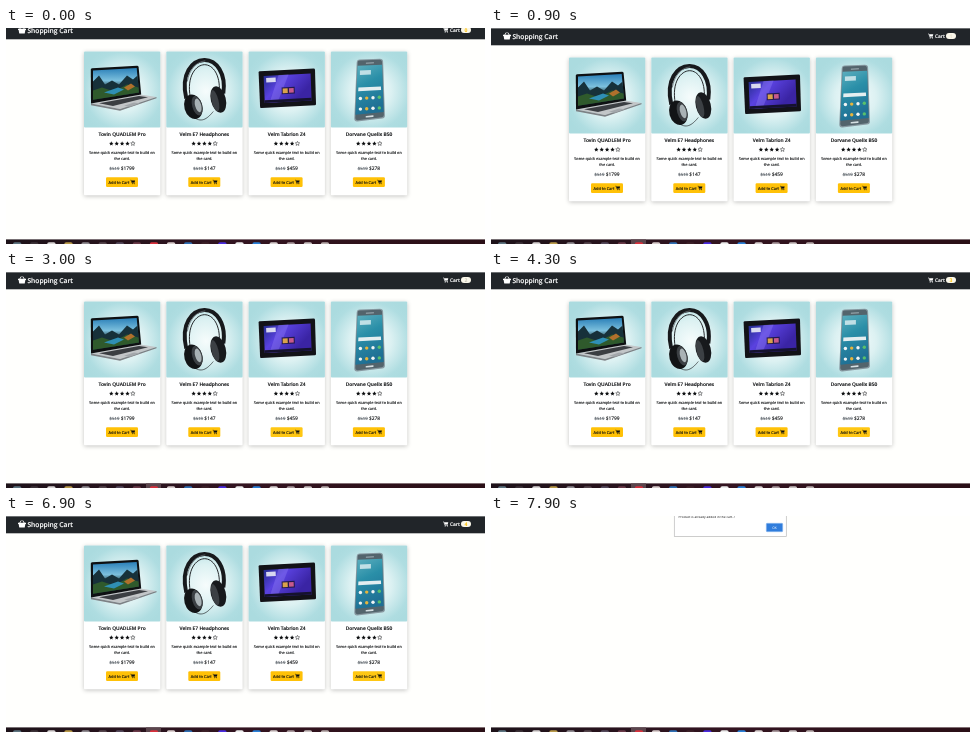
Write an HTML page that moves like this. It is 479 by 216 pixels and loops after 8000 ms.

```html
<!DOCTYPE html>
<html lang="en">
<head>
<meta charset="utf-8">
<title>Shopping Cart</title>
<style>
  html, body { margin: 0; width: 479px; height: 216px; overflow: hidden; background: #fffffd; }
  svg { display: block; font-family: "Open Sans", "Noto Sans", sans-serif; text-rendering: geometricPrecision; }
  .card { filter: drop-shadow(0 1.5px 2px rgba(0, 0, 0, .24)); }
  .mid { text-anchor: middle; }
  .head { font-weight: 600; }
  .ink { fill: #0c0e10; stroke: #0c0e10; stroke-width: .12; }
  .old { fill: #5a6168; stroke: #5a6168; text-decoration: line-through; text-decoration-thickness: .3px; }
</style>
</head>
<body>
<svg id="stage" width="479" height="216" viewBox="0 0 479 216">
  <defs>
    <radialGradient id="backdrop" cx=".52" cy=".52" r=".6">
      <stop offset="0" stop-color="#f6fcfc"/>
      <stop offset=".45" stop-color="#dcf1f2"/>
      <stop offset=".85" stop-color="#afdde1"/>
      <stop offset="1" stop-color="#abdbdf"/>
    </radialGradient>
    <linearGradient id="sky" x2="0" y2="1">
      <stop offset="0" stop-color="#2a7fb8"/>
      <stop offset=".4" stop-color="#7cc0dd"/>
      <stop offset=".6" stop-color="#2a4a52"/>
      <stop offset="1" stop-color="#0e1c1e"/>
    </linearGradient>
    <linearGradient id="violet" x2=".9" y2=".5">
      <stop offset="0" stop-color="#1f2a86"/>
      <stop offset=".45" stop-color="#5a42e0"/>
      <stop offset="1" stop-color="#3a24a4"/>
    </linearGradient>
    <linearGradient id="aqua" x2=".3" y2="1">
      <stop offset="0" stop-color="#5fb0bf"/>
      <stop offset=".45" stop-color="#2a8fa8"/>
      <stop offset="1" stop-color="#1f6f94"/>
    </linearGradient>
    <linearGradient id="bar">
      <stop offset="0" stop-color="#1d1219"/>
      <stop offset=".5" stop-color="#331420"/>
      <stop offset="1" stop-color="#2a0f16"/>
    </linearGradient>
    <g id="trolley">
      <path d="M0 .3H.9L1.9 3.6H4.9" fill="none" stroke="currentColor" stroke-width=".55"/>
      <path d="M1.1 .7H5.3L4.7 3H1.7Z" fill="currentColor"/>
      <circle cx="2.2" cy="4.3" r=".55" fill="currentColor"/>
      <circle cx="4.4" cy="4.3" r=".55" fill="currentColor"/>
    </g>
    <g id="laptop">
      <path d="M7 52L56 43L72.5 45.6L36 57.5Z" fill="#c3c6c8"/>
      <path d="M7 52L36 57.5L72.5 45.6V46.8L36 59.2L7 53.8Z" fill="#7d8185"/>
      <path d="M15 51.8L55 44.4L64 45.8L29 54.6Z" fill="#3b3e42"/>
      <path d="M40 54.2L50 51L56 51.8L46 55.2Z" fill="#a3a7ab"/>
      <path d="M6.8 18.2Q6.8 17 8 16.8L53 14.2Q54.4 14.2 54.6 15.4L57.2 43L7 52Z" fill="#0e1012"/>
      <path d="M9 19.1L52.7 16.4L54.9 41L9 48.2Z" fill="url(#sky)"/>
      <path d="M9 30L15 24L21 33L28 29L35 33L43 24L49 28L53.6 24L54.9 41L9 48.2Z" fill="#17313a"/>
      <path d="M9 39L18 36L30 40L43 33L54.5 36L54.9 41L9 48.2Z" fill="#2f5a2c"/>
      <path d="M20 41L34 36L40 38L30 43Z" fill="#2f8fb5"/>
      <path d="M40 36L47 32L51 35L44 39Z" fill="#b0702c"/>
    </g>
    <g id="phones" fill="none">
      <path d="M20 47C14 22 26 8.8 38 8.5C50 8.2 60 22 57 42" stroke="#17191c" stroke-width="4"/>
      <path d="M24 46C20 24 30 13.5 38 13.2C47 13 54 24 53 40" stroke="#26292c" stroke-width="1"/>
      <path d="M21 30C23 18 30 10 39 9.4" stroke="#666c71" stroke-width=".8"/>
      <path d="M28 66C36 72 42 66 47 60" stroke="#26292c" stroke-width=".7"/>
      <g transform="rotate(-14 52 48)">
        <ellipse cx="52" cy="48" rx="7.5" ry="13.5" fill="#17191c"/>
        <ellipse cx="48.6" cy="48.5" rx="3.4" ry="11" fill="#3c4044"/>
      </g>
      <g transform="rotate(-16 28 55)">
        <ellipse cx="27" cy="55" rx="9" ry="12.5" fill="#121416"/>
        <ellipse cx="31" cy="55" rx="5" ry="10" fill="#3c4044"/>
        <ellipse cx="32" cy="55" rx="3" ry="7" fill="#a9b2b5"/>
      </g>
    </g>
    <g id="tablet">
      <path d="M10 21Q10 19.8 11.2 19.7L65 17Q66.3 17 66.4 18.2L67.4 52.5Q67.4 53.7 66.2 53.8L13 56.6Q11.6 56.6 11.5 55.4Z" fill="#121217"/>
      <path d="M15 24.4L62 22L63 49L16.2 51.5Z" fill="url(#violet)"/>
      <path d="M30 23.6L40 23.1L29 50.8L21 51.2Z" fill="#8e7cf2" opacity=".4"/>
      <path d="M17.5 26.5L27 26L27.2 30.5L17.7 31Z" fill="#d8d8f0"/>
      <path d="M33 36L46 35.3L46.3 42L33.3 42.7Z" fill="#241a4c"/>
      <path d="M34 37L39 36.7L39.2 41.4L34.2 41.7Z" fill="#d9a24a"/>
      <path d="M40.3 36.7L45 36.4L45.2 41L40.5 41.3Z" fill="#c85a8c"/>
      <path d="M16 48.8L62.9 46.3L63 49L16.2 51.5Z" fill="#15122e"/>
    </g>
    <g id="mobile">
      <path d="M25.8 11Q26 8.2 28.8 8.1L49 7.2Q52 7.2 52.2 10L54 64Q54.2 66.6 51.2 67L26.6 70Q23.4 70.3 23.4 67Z" fill="#8798a0"/>
      <path d="M26.8 11Q26.8 9.2 28.7 9.1L48.8 8.3Q50.9 8.3 51.1 10.2L53 63.4Q53 65.4 50.9 65.7L26.8 68.7Q24.4 68.9 24.4 66.6Z" fill="#53646c"/>
      <path d="M26.6 14.2L51.2 13.2L52.8 60.4L24.5 63.2Z" fill="url(#aqua)"/>
      <path d="M29 19L40 18.5L40 23L29 23.6Z" fill="#e0f0f2" opacity=".8"/>
      <path d="M27.5 36L50 35L50.2 38.6L27.3 39.8Z" fill="#e4eef0"/>
      <path d="M35 11.7L43 11.3" stroke="#c6d3d8" stroke-width=".7"/>
      <path d="M35.5 65.3L42 64.6" stroke="#d5dfe2" stroke-width="1.6" stroke-linecap="round"/>
      <g id="apps">
        <circle cx="29.5" cy="47" r="1.7" fill="#f0f4f4"/><circle cx="35.8" cy="46.6" r="1.7" fill="#e6b53c"/>
        <circle cx="42.1" cy="46.2" r="1.7" fill="#f0f4f4"/><circle cx="48.4" cy="45.8" r="1.7" fill="#58c06c"/>
      </g>
      <use href="#apps" y="10.6"/>
    </g>
  </defs>

  <g id="page">
    <rect width="479" height="17.3" fill="#212529"/>
    <rect width="479" height=".7" fill="#8d9093"/>
    <g fill="#fff">
      <path d="M12 6.8H20V8H19.4L18.7 11.4H13.3L12.6 8H12Z"/>
      <path d="M13.6 7.2L15.3 4.4M18.4 7.2L16.7 4.4" stroke="#fff" stroke-width=".9"/>
      <text class="head" x="21.4" y="10.6" font-size="6.7" stroke="#fff" stroke-width=".15">Shopping Cart</text>
      <use href="#trolley" x="437" y="5.6" color="#fff"/>
      <text class="head" x="443.9" y="9.8" font-size="4.9" stroke="#fff" stroke-width=".15">Cart</text>
    </g>
    <rect x="455" y="5" width="10" height="6" rx="3" fill="#faf7ea"/>
    <text id="count" class="mid" x="460" y="9.9" font-size="5.1" font-weight="700"></text>
    <g id="cards"></g>
  </g>

  <g id="dialog">
    <rect x="183.3" y="-20" width="112" height="40.4" fill="#fff" stroke="#b9b9b9" stroke-width=".7"/>
    <text x="187.6" y="1.7" font-size="3.25" fill="#111">Product is already added in the cart..!</text>
    <rect id="ok" x="275.3" y="7.3" width="16.4" height="8.4" rx=".8" stroke="#8db9ee" stroke-width=".6"/>
    <text class="mid" x="283.5" y="12.8" font-size="3.4" fill="#fff">OK</text>
  </g>

  <g id="taskbar">
    <rect y="211.4" width="479" height="5" fill="url(#bar)"/>
    <rect id="active" x="140" y="211.4" width="15" height="5" fill="#5b454c"/>
  </g>
</svg>
<script>
const LOOP = 8000, TICK = 100;
const $ = id => document.getElementById(id);

const products = [
  ["Tovin QUADLEM Pro", "$1799", "laptop"],
  ["Velm E7 Headphones", "$147", "phones"],
  ["Velm Tabrion Z4", "$459", "tablet"],
  ["Dorvane Quelix B50", "$278", "mobile"],
];

// [button, from, to]
const hovers = [
  [0, 300, 900], [1, 1900, 2500], [2, 2900, 4000],
  [3, 4200, 5200], [3, 5600, 5800], [3, 6600, LOOP],
];
const countSteps = [900, 2500, 3700, 5200];
const countColors = ["#ffc107", "#e9e2cc", "#c8c5b8", "#ffc107", "#ffc107"];

function star(cx, cy, filled) {
  const pts = Array.from({ length: 10 }, (_, i) => {
    const r = i % 2 ? 1.05 : 2.3, a = i * Math.PI / 5;
    return `${(cx + r * Math.sin(a)).toFixed(2)},${(cy - r * Math.cos(a)).toFixed(2)}`;
  });
  const paint = filled ? 'fill="#0c0e10"' : 'fill="none" stroke="#0c0e10" stroke-width=".45"';
  return `<polygon points="${pts.join(" ")}" ${paint}/>`;
}

function card([name, price, art], i) {
  const stars = [0, 1, 2, 3, 4].map(n => star(27.3 + n * 5.4, 92.1, n < 4)).join("");
  return `<g transform="translate(${78 + i * 82.3} 29.5)">
    <rect class="card" width="76.3" height="143.7" rx="1" fill="#fff"/>
    <rect width="76.3" height="76" rx="1" fill="url(#backdrop)"/>
    <use href="#${art}"/>
    <g class="mid ink" font-size="3.88">
      <text class="head" x="38.1" y="84.7" font-size="4.9">${name}</text>
      <text x="38.1" y="102.2">Some quick example text to build on</text>
      <text x="38.1" y="108.2">the card.</text>
      <text x="38.1" y="118.7" font-size="4.9"><tspan class="old" font-size="4.3">$519</tspan> ${price}</text>
    </g>
    ${stars}
    <rect class="btn" x="22" y="125.7" width="32" height="9.8" rx="1.2"/>
    <text class="ink" x="24.5" y="132" font-size="3.95">Add to Cart</text>
    <use href="#trolley" transform="translate(46.4 128.4) scale(.88)" color="#0c0e10"/>
  </g>`;
}
$("cards").innerHTML = products.map(card).join("");

const icons = ["#5d7480", "#3c3238", "#d8d4d4", "#b99a4a", "#8f8a90", "#55454c", "#554a5c",
  "#6a3a48", "#d8303c", "#d8cccc", "#2f6fb4", "#3c2028", "#4a2be0", "#ececec", "#2a80d8",
  "#d8d0d0", "#a8989c", "#c8c0c0", "#b8acac"];
$("taskbar").insertAdjacentHTML("beforeend", icons.map((c, i) =>
  `<rect x="${(7 + i * 17.1).toFixed(1)}" y="214.2" width="8.4" height="6" rx="1.8" fill="${c}"/>`).join(""));

const buttons = [...document.querySelectorAll(".btn")];

function hoverLevel(i, t) {
  const h = hovers.find(([b, from, to]) => b === i && t >= from && t < to);
  return h ? (t === h[1] ? 0.5 : 1) : 0;
}

function draw(time) {
  const t = Math.floor(time % LOOP / TICK) * TICK;
  const n = countSteps.filter(s => t >= s).length;
  const show = (id, on) => $(id).style.display = on ? "" : "none";

  $("page").setAttribute("transform", `translate(0 ${t < 900 ? -6 : 0})`);
  show("page", t < 7000);
  show("dialog", t >= 7100);
  show("active", t >= 700);
  $("count").textContent = n;
  $("count").setAttribute("fill", countColors[n]);
  buttons.forEach((b, i) => {
    const k = hoverLevel(i, t);
    b.setAttribute("fill", `rgb(255 ${193 + 6 * k} ${7 + 12 * k})`);
  });
  $("ok").setAttribute("fill", t < 7800 ? "#1a6fd4" : t < 7900 ? "#2576d8" : "#307ddc");
}

const start = performance.now();
(function frame() {
  draw(performance.now() - start);
  requestAnimationFrame(frame);
})();
</script>
</body>
</html>
```
